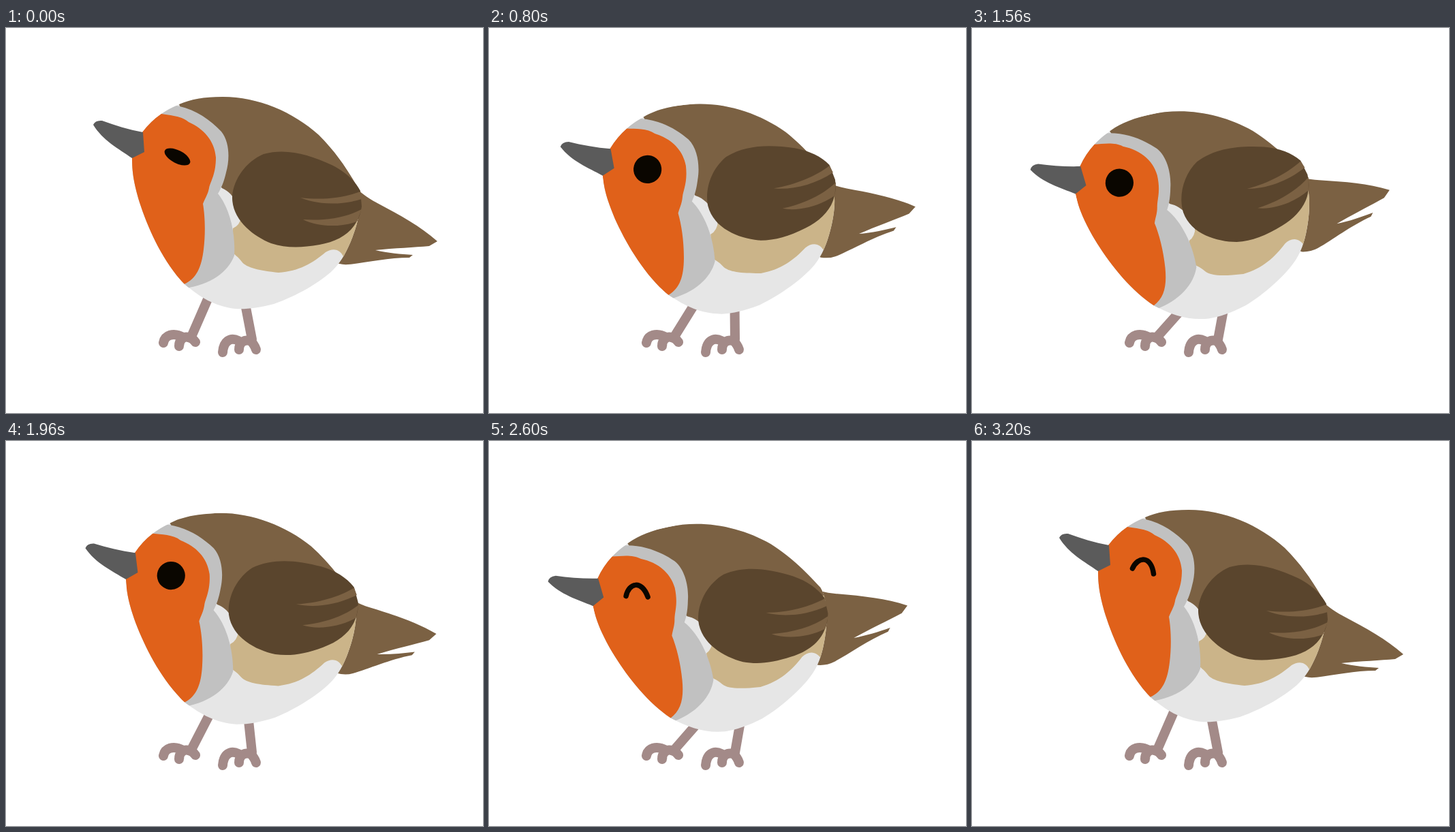
An HTML page that plays this animation: 700 px wide and 565 px high, repeating every 3240 ms.

```html
<!DOCTYPE html>
<html lang="en">
<head>
<meta charset="utf-8">
<title>Bobbing robin</title>
<style>
  html, body { margin: 0; width: 100%; height: 100%; overflow: hidden; background: #fff; }
  svg { display: block; width: 700px; height: 565px; }
  .brown { fill: #7b6143; }
  .dark { fill: #5a452d; }
  .white { fill: #e6e6e6; }
  .grey { fill: #c1c1c1; }
  .tan { fill: #cbb489; }
  .orange { fill: #e0611a; }
  .beak { fill: #5b5b5b; }
  .leg { fill: none; stroke: #a38a88; stroke-width: 14; stroke-linecap: round; stroke-linejoin: round; }
  .eye { fill: #0a0600; }
  .smile { fill: none; stroke: #0a0600; stroke-width: 7.5; stroke-linecap: round; }
</style>
</head>
<body>
<svg viewBox="0 0 700 565">
  <defs>
    <clipPath id="outline">
      <path d="M228 126Q240 118 250 114C268 105 288 101 318 101C370 101 421 123 459 157C487 185 502 210 517 235C524 255 517 285 508 308C501 326 493 342 480 355C462 373 425 394 393 405C370 411 352 413 336 412C305 408 285 395 262 376C230 343 208 293 196 256C187 226 185 210 185 191L200 153Q212 137 228 126Z"/>
    </clipPath>
  </defs>

  <g class="leg">
    <path id="legL"/>
    <path id="legR"/>
    <path d="M231 462C233 450 246 447 258 453M254 467C254 456 262 452 268 454Q274 455 278 461"/>
    <path d="M318 476C319 460 329 453 341 459M342 472C342 461 350 457 358 459Q364 463 367 472"/>
  </g>

  <g id="body">
    <path id="tail" class="brown" d="M470 190C498 220 515 241 545 257C579 275 608 291 633 313L621 320C600 322 570 323 542 326C560 330 580 332 597 333L592 337C560 337 525 345 502 347Q490 348 478 342L440 300Z"/>
    <g clip-path="url(#outline)">
      <rect class="white" x="170" y="90" width="370" height="335"/>
      <path class="brown" d="M245 90H545V262H505L400 300L346 284C343 262 335 243 317 235L290 200Z"/>
      <path class="tan" d="M333 294Q343 290 346 276L400 250L498 253Q505 245 517 247L530 250V340H497C492 324 480 322 469 329C450 345 430 357 400 359C372 356 353 352 346 343C340 335 336 333 330 328Z"/>
      <path class="grey" d="M170 180L222 110L250 114C277 119 299 134 316 152C329 168 328 195 323 212C320 225 316 235 311 243C328 264 337 300 335 334C326 358 300 377 262 382L230 380Z"/>
      <path class="orange" d="M170 190L200 126H228C240 128 258 129 268 138C290 148 306 165 308 190C308 215 300 225 298 235C296 245 292 250 289 258C292 275 293 300 290 325C287 350 280 368 261 376L230 380Z"/>
    </g>
    <path class="beak" d="M128 142Q131 135 141 136C160 143 180 149 201 153L203 182L185 191C165 177 142 165 128 142Z"/>
    <ellipse id="eye" class="eye" cx="251.5" cy="189" rx="20.6"/>
    <path id="smile" class="smile" d="M235.5 187C243.5 169 263 168 266.5 195"/>
    <g id="wing">
      <path class="dark" d="M332 247C334 222 352 196 378 185C412 176 445 186 478 201C498 211 512 224 520 239L522 262Q520 276 514 285C505 302 485 314 460 318C432 323 411 323 389 316C362 305 331 281 332 247Z"/>
      <path class="brown" d="M432 249C465 253 497 249 520 240L522 251C490 261 457 259 432 249Z"/>
      <path class="brown" d="M436 281C467 283 497 279 522 266L515 284C490 293 457 292 436 281Z"/>
    </g>
  </g>
</svg>
<script>
const LOOP = 3240, STEP = 40, BOB = 3200 / 3, SHUT = 2 * BOB;
const BODY_TILT = 12.7;

// [part of one bob, extra degrees]
const WING = [[0, 0], [.05, 4], [.2125, 16], [.4125, 18], [.4625, -9], [.7, -11]];
const TAIL = [[0, 0], [.05, 3.5], [.2125, 1.2], [.4125, -9.1], [.4625, -11.9], [.7, -12.6]];

const el = id => document.getElementById(id);
const mix = (a, b, k) => a + (b - a) * k;
const turn = (id, deg, x, y) => el(id).setAttribute("transform", `rotate(${deg} ${x} ${y})`);

// Smooth periodic curve through the keys
function curve(keys, u) {
  const n = keys.length;
  const key = i => {
    const lap = Math.floor(i / n), [x, y] = keys[i - lap * n];
    return [x + lap, y];
  };
  const slope = i => {
    const [x0, y0] = key(i - 1), [x1, y1] = key(i + 1);
    return (y1 - y0) / (x1 - x0);
  };
  let i = 0;
  while (key(i + 1)[0] <= u) i++;
  const [x0, y0] = key(i), [x1, y1] = key(i + 1);
  const h = x1 - x0, s = (u - x0) / h, r = 1 - s;
  return y0 * (1 + 2 * s) * r * r + slope(i) * h * s * r * r
       + y1 * s * s * (3 - 2 * s) - slope(i + 1) * h * s * s * r;
}

function leg(id, from, to, foot, p) {
  const x = mix(from[0], to[0], p), y = mix(from[1], to[1], p);
  el(id).setAttribute("d", `M${x} ${y}L${foot}`);
}

function drawEye(t) {
  const smiling = t >= SHUT;
  const squint = t < STEP || (t > SHUT - STEP && !smiling);
  el("eye").style.display = smiling ? "none" : "";
  el("smile").style.display = smiling ? "" : "none";
  el("eye").setAttribute("ry", squint ? 9.5 : 20.6);
  turn("eye", squint ? 27 : 0, 251.5, 189);
}

function draw(t) {
  const u = (t / BOB) % 1;
  const p = (1 - Math.cos(2 * Math.PI * u)) / 2;
  turn("body", -BODY_TILT * p, 408, 368);
  turn("tail", curve(TAIL, u), 502, 284);
  turn("wing", curve(WING, u), 364, 240);
  leg("legL", [299, 391], [309, 412], "272 453", p);
  leg("legR", [351, 405], [370, 410], "361 457", p);
  drawEye(t);
}

const start = performance.now();
function tick() {
  const t = (performance.now() - start) % LOOP;
  draw(Math.floor(t / STEP) * STEP);
  requestAnimationFrame(tick);
}
tick();
</script>
</body>
</html>
```
